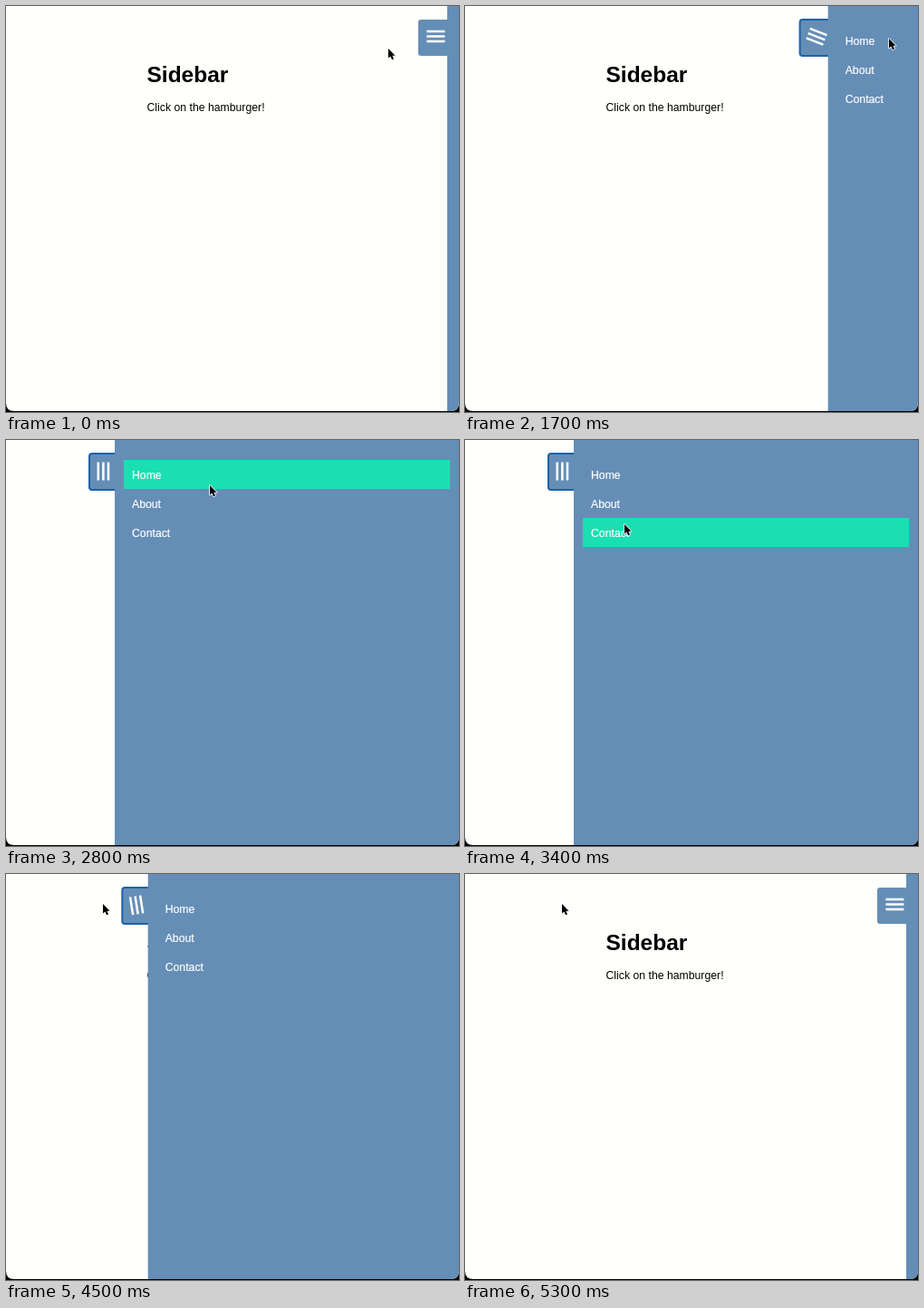
An HTML page that plays this animation: 500x448 px, repeating every 6100 ms.

```html
<!DOCTYPE html>
<html lang="en">
<head>
<meta charset="utf-8">
<title>Sidebar</title>
<style>
  html, body { margin: 0; width: 100%; height: 100%; overflow: hidden; background: #000; }
  svg { display: block; width: 500px; height: 448px; }
  text { font-family: "Liberation Sans", Arial, Helvetica, sans-serif; font-size: 12.25px; }
  .title { font-size: 24.5px; font-weight: bold; }
  .panel { fill: #658eb6; }
  .label { fill: #fff; stroke: #fff; stroke-width: .2; }
  .hover { fill: #1adfb2; }
</style>
</head>
<body>
<svg viewBox="0 0 500 448">
  <defs>
    <clipPath id="window"><path d="M0 0H500V438Q500 447 491 447H9Q0 447 0 438Z"/></clipPath>
  </defs>
  <g clip-path="url(#window)">
    <rect width="500" height="448" fill="#fffffc"/>
    <text class="title" x="155.5" y="84">Sidebar</text>
    <text x="155.5" y="116">Click on the hamburger!</text>
    <g id="sidebar">
      <g id="button">
        <path class="panel" d="M33 15H3Q0 15 0 18V52Q0 55 3 55H33Z"/>
        <path id="ring" d="M33 15H3Q0 15 0 18V52Q0 55 3 55H33" fill="none" stroke="#1d62a8" stroke-width="2"/>
      </g>
      <rect class="panel" width="500" height="448"/>
      <path id="bars" d="M-10 -5.6H10M-10 0H10M-10 5.6H10" stroke="#fff" stroke-width="2.5"/>
      <g id="menu"></g>
    </g>
    <path id="cursor" d="M0 0V10.6L2.4 8.4L4.1 12.2L6 11.4L4.4 7.7H7.6Z"
      fill="#000" stroke="#fff" stroke-width="1.5" stroke-linejoin="round" paint-order="stroke"/>
  </g>
</svg>
<script>
const LOOP = 6100, STEP = 100;
const CLOSED_X = 487, OPEN_X = 120, SLIDE = 600;
const OPEN_AT = 1596, CLOSE_AT = 4438;
const ROW_TOP = 22, ROW_HEIGHT = 32;

// time, x, y of the pointer tip
const pointerPath = [
  [0, 422, 47], [700, 458, 40], [800, 458, 40], [1000, 460, 39],
  [1500, 468, 36], [2200, 468, 36], [2500, 350, 40], [2800, 225, 50],
  [3100, 185, 72], [3400, 176, 93], [3700, 174, 93], [4000, 140, 62],
  [4300, 107, 33], [LOOP, 107, 33]
];

const find = id => document.getElementById(id);
const [sidebar, button, ring, bars, menu, cursor] =
  ["sidebar", "button", "ring", "bars", "menu", "cursor"].map(find);
const mix = (a, b, p) => a + (b - a) * p;
const clamp = v => Math.min(1, Math.max(0, v));
const move = (el, x, y, extra = "") =>
  el.setAttribute("transform", `translate(${x} ${y}) ${extra}`);

menu.innerHTML = ["Home", "About", "Contact"].map((name, i) => {
  const y = ROW_TOP + i * ROW_HEIGHT;
  return `<rect class="hover" x="10" y="${y}" width="360" height="${ROW_HEIGHT}"/>
    <text class="label" x="19" y="${y + 20.6}">${name}</text>`;
}).join("");
const rows = [...menu.querySelectorAll("rect")];

// cubic-bezier(.25, .1, .25, 1)
function ease(x) {
  if (x <= 0 || x >= 1) return clamp(x);
  const bezier = (a, b, u) =>
    3 * a * u * (1 - u) ** 2 + 3 * b * u * u * (1 - u) + u ** 3;
  let low = 0, high = 1;
  for (let i = 0; i < 24; i++) {
    const mid = (low + high) / 2;
    if (bezier(0.25, 0.25, mid) < x) low = mid; else high = mid;
  }
  return bezier(0.1, 1, low);
}

function pointerAt(t) {
  const i = pointerPath.findIndex(point => point[0] > t);
  const [t0, x0, y0] = pointerPath[i - 1], [t1, x1, y1] = pointerPath[i];
  const p = (t - t0) / (t1 - t0);
  return [mix(x0, x1, p), mix(y0, y1, p)];
}

function draw(t) {
  const open = ease((t - OPEN_AT) / SLIDE) - ease((t - CLOSE_AT) / SLIDE);
  const left = mix(CLOSED_X, OPEN_X, open);
  move(sidebar, left, 0);
  move(button, mix(-32, -28, open), 0);
  move(bars, -12.6, mix(33.5, 34.5, open), `rotate(${90 * open})`);
  ring.setAttribute("opacity", t < OPEN_AT ? 0 : clamp((5300 - t) / 200));

  const [x, y] = pointerAt(t);
  move(cursor, x, y);
  // Hover only registers once the pointer moves over the open menu
  const inMenu = t > 2200 && t < CLOSE_AT && x > left + 10 && x < left + 370;
  const hovered = inMenu ? Math.floor((y - ROW_TOP) / ROW_HEIGHT) : -1;
  rows.forEach((row, i) => row.setAttribute("visibility", i === hovered ? "visible" : "hidden"));
}

const start = performance.now();
function tick() {
  const t = (performance.now() - start) % LOOP;
  draw(Math.floor(t / STEP) * STEP);
  requestAnimationFrame(tick);
}
tick();
</script>
</body>
</html>
```
